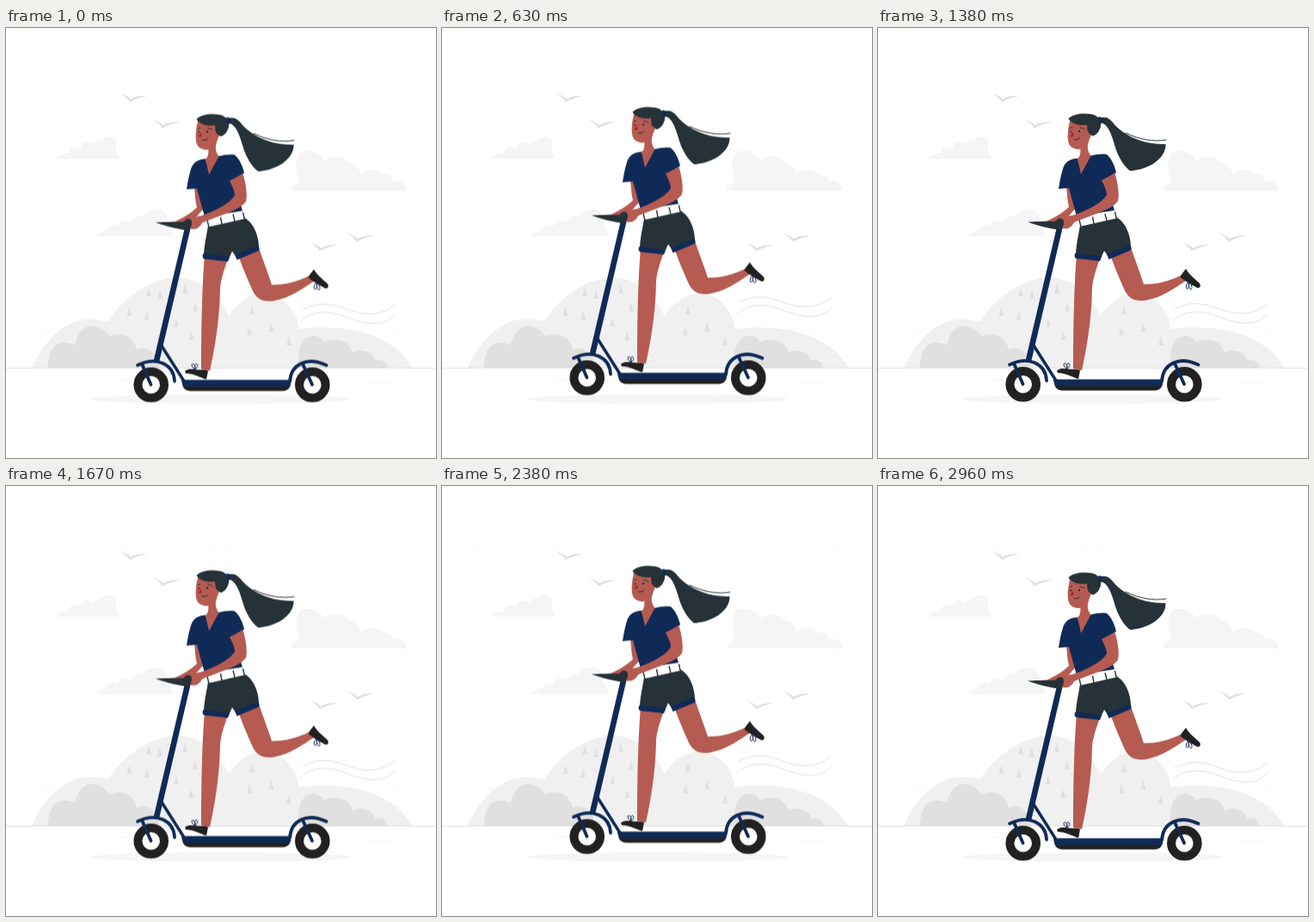
Write an HTML page without scripts that moves like this. It is 500x500 px and loops after 3 s.

```html
<!DOCTYPE html>
<html lang="en">
<head>
<meta charset="utf-8">
<title>Scooter ride</title>
<style>
html, body { margin: 0; width: 100%; height: 100%; overflow: hidden; background: #fff; }
svg { display: block; width: 100%; height: 100%; }
.ride { animation: bob 1.5s linear -30ms infinite; }
@keyframes bob {
  0%, 100% { transform: translateY(.2px); }
  50% { transform: translateY(-9.8px); }
}
.navy { fill: #102a57; }
.dark { fill: #263238; }
.skin { fill: #b55b52; }
.tube { fill: none; stroke: #102a57; stroke-width: 3.8; stroke-linecap: round; stroke-linejoin: round; }
.thin { fill: none; stroke-width: 1; stroke-linecap: round; }
</style>
</head>
<body>
<svg viewBox="0 0 500 500">
  <defs>
    <path id="tree" d="M0 0L3 10.5H-3Z"/>
    <path id="bird" d="M0 0C5 2 10 4 13 7C19 3.500 26 3 32 3.500C25 5 18 7 12 10.500C9 6 5 3 0 0Z"/>
    <circle id="wheel" r="15.300" fill="#fff" stroke="#212121" stroke-width="10"/>
  </defs>

  <!-- scenery -->
  <g fill="none" stroke="#fafafa">
    <rect x="39" y="68.500" width="203.500" height="283" rx="4"/>
    <rect x="255" y="68.500" width="204" height="283" rx="4"/>
  </g>
  <g fill="#f5f5f5">
    <path d="M58 152C62 146 68 145 72 146C74 138 81 136 86 141C88 133 97 130 102 137C104 131 108 130 111 131C116 125 125 126 127 130C129 135 128 141 127 144C130 146 132 149 132 152Z"/>
    <path d="M104 242.500C107 237 112 236 116 236C118 229 125 227 129 231C131 223 139 221 144 227C147 220 153 217 158 220C161 213 171 209 181 212C187 215 189 222 188 230C192 233 194 238 194 242.500Z"/>
    <path d="M330 189C332 184 336 181 341 179C336 165 336 148 344 144C354 140 367 146 370 154C380 146 394 149 398 156C406 157 412 164 412 170C421 162 434 164 439 171C444 169 449 172 450 179C458 175 465 181 466 189Z"/>
  </g>
  <g fill="#e0e0e0">
    <use href="#bird" x="132" y="75.500"/>
    <use href="#bird" x="170" y="106"/>
    <use href="#bird" x="353" y="249"/>
    <use href="#bird" x="396" y="238"/>
  </g>
  <path fill="#f0f0f0" d="M30 395C44 364 68 339 96 338.500C104 338 112 340 119 341C137 312 170 290 200 290C227 291 247 310 259 335C269 319 283 309 298 308.500C321 309 337 326 341 350C391 344 449 353 472 395Z"/>
  <g fill="#e0e0e0">
    <path d="M49 395C49 380 54 366 66 366C71 365 76 367 80 369C83 355 90 347 99 346.500C108 346 116 351 121 359C131 352 149 358 152 374C163 368 177 378 178 395Z"/>
    <path d="M341 395C337 372 345 358 357 358C363 358 367 360 370 365C383 359 401 364 403 378C412 372 427 376 429 387C436 384 443 388 443 395Z"/>
    <use href="#tree" x="166" y="301.500"/>
    <use href="#tree" x="179" y="304.500"/>
    <use href="#tree" x="208" y="298.500"/>
    <use href="#tree" x="143.500" y="324.500"/>
    <use href="#tree" x="164" y="328.500"/>
    <use href="#tree" x="220" y="319"/>
    <use href="#tree" x="198" y="336.500"/>
    <use href="#tree" x="215.500" y="352.500"/>
    <use href="#tree" x="286" y="322.500"/>
    <use href="#tree" x="283" y="347"/>
    <use href="#tree" x="308.500" y="342.500"/>
    <use href="#tree" x="329" y="358.500"/>
  </g>
  <path d="M0 395.500H500" stroke="#e4e4e4"/>
  <path d="M132 408.500H148M416 412.500H448" stroke="#f5f5f5"/>
  <ellipse cx="250" cy="431.500" rx="152" ry="5.500" fill="#f5f5f5"/>

  <g class="ride">
    <g class="thin" stroke="#e0e0e0">
      <path d="M345 328C365 317 382 322 398 328C422 336 437 334 452 322"/>
      <path d="M343 341C356 329 374 329 392 335C420 346 440 349 453 333"/>
    </g>

    <!-- far arm -->
    <path class="skin" d="M219 185H224L231 210C225 214 220 224 211 229L195 226C204 222 215 216 222 209C220 202 220 194 219 185Z"/>

    <!-- legs -->
    <path class="skin" d="M269 262C275 279 282 295 286 304C291 316 299 319.500 312 317.500C331 314 345 303 358 295L353.500 288C338 296 323 299 309 299C305 286 299 271 293 253Z"/>
    <path d="M358 281C362 288 369 293 374 298C376 301 374 304 371 303C365 300 358 296 352 291C351 289 355 285 358 281Z" fill="#212121"/>
    <path class="thin" stroke="#102a57" d="M361 296C357 300 358 305 360 304C362 303 362 299 361 296C365 299 366 304 364 305C362 305 361 300 361 296"/>
    <path class="skin" d="M231 264C228 300 227 350 227 397L237 399C242.500 374 248.500 340 249 303C250 291 255 278 259 266Z"/>
    <path d="M208 399.500C211 396.500 216 397 222 397.500C227 398 231 397 235 399L233 409C226 407 218 402 209 402Z" fill="#212121"/>
    <path class="thin" stroke="#102a57" d="M220 397C216 396 215 391 217 391C220 391 220 395 220 397C219 393 220 390 222 391C224 393 222 396 220 397"/>

    <!-- scooter -->
    <use href="#wheel" x="168.700" y="415.300"/>
    <use href="#wheel" x="356.300" y="415.300"/>
    <path fill="#212121" d="M205 411H331V413C331 419 327 422.500 322 422.500H214C209 422.500 205 419 205 413Z"/>
    <path class="navy" d="M204 409.500H331V413C331 416 330 417.500 328 417.500H209C206 417.500 204 413 204 409.500Z"/>
    <g class="tube">
      <path d="M153 392.500C175 382 195 391 196 411"/>
      <path d="M158 391L168.500 415"/>
      <path d="M330 412C331 391 350 382 372.500 392.500"/>
      <path d="M345 391L356 415"/>
      <path d="M180 368.500L207 411" stroke-width="3.500"/>
      <path d="M211.700 231L175 387.500" style="stroke-width:6.700;stroke-linecap:butt"/>
    </g>

    <!-- body -->
    <path class="dark" d="M235 230L277 221C288 226 294 243 294 255L268 267L263 260L258 271L230 267C230 254 233 243 235 230Z"/>
    <path class="navy" d="M230 262.500L260 266.500L258 272L231 269C228 269 228 263 230 262.500ZM266 264L293 253.500C295 255 295 258 293.500 259.500L268.500 270Z"/>
    <path class="navy" d="M232 152.500C225 153 219 155 215.500 163C212.500 172 211 181 210 188L222 187L231 220L275 213L264 177L277 169C275 160 271 152 266 148C260 147 254 148 247 149.500L236.500 169Z"/>
    <path d="M233.500 224.300L275.500 214.700L277.200 222.300L235 231.700Z" fill="#fff"/>
    <path d="M234 224L236 232M249.500 220.500L251 228.500M264 217L266 225M275.500 214.700L277 222" stroke="#263238" stroke-width="1.400"/>
    <path class="skin" d="M260 178L275.500 170C279 182 281 195 279 202C273 212 249 218 228 227C224 236 214 236 211 231C212 225 219 219 226 219C241 214 259 206 266 195C266 190 263 184 260 178Z"/>
    <path class="dark" d="M174 226.500C188 225.500 199 226 207 225.500C208 222 213 221 215.500 224C217 228 215 234 212 236C201 234 187 231.500 174 226.500Z"/>

    <!-- head -->
    <path class="skin" d="M235 138C236 146 235 151 232 152.500L236 171L247.500 149.500C244 145 243 140 244.500 133Z"/>
    <path class="skin" d="M223 109C220 122 219 135 225 139.500C232 144 241 142 244.500 135C246 128 249 125 250 118V110Z"/>
    <path class="dark" d="M221.500 106.500C226 101 238 99.500 247 101C256 102 261 109 258.500 117C256.500 122 254 125.500 249.500 126.500L245.500 123.500C243 121 243.500 117 243 113.500C236 114.500 226 113.500 221.500 106.500Z"/>
    <path class="dark" d="M258 105.500C266 103 270 107 274 112C280 120 302 137 334.500 136C335 146 327 155 318 160C308 165 299 167 293 167C286 162 279 150 276 140C271 122 267 113 259 111Z"/>
    <path class="thin" stroke="#263238" d="M288 123C302 130 320 134 335 131"/>
    <path class="navy" d="M256 104.500C259 104 261 105 261.500 107L260 112L257 111Z"/>
    <circle cx="224.500" cy="121.500" r="1" class="dark"/>
    <circle cx="234" cy="121" r="1.200" class="dark"/>
    <path d="M227 122L223.500 126.500C225 127.500 226 127.500 227.500 126.500Z" fill="#a02724"/>
    <g class="thin" stroke="#263238">
      <path d="M228 130.500C231 131.500 233 130.500 235 128.500"/>
      <path d="M235 117C237 116.500 239 118 240 119M223.500 117.500L225.500 116.500"/>
    </g>
  </g>
</svg>
</body>
</html>
```
